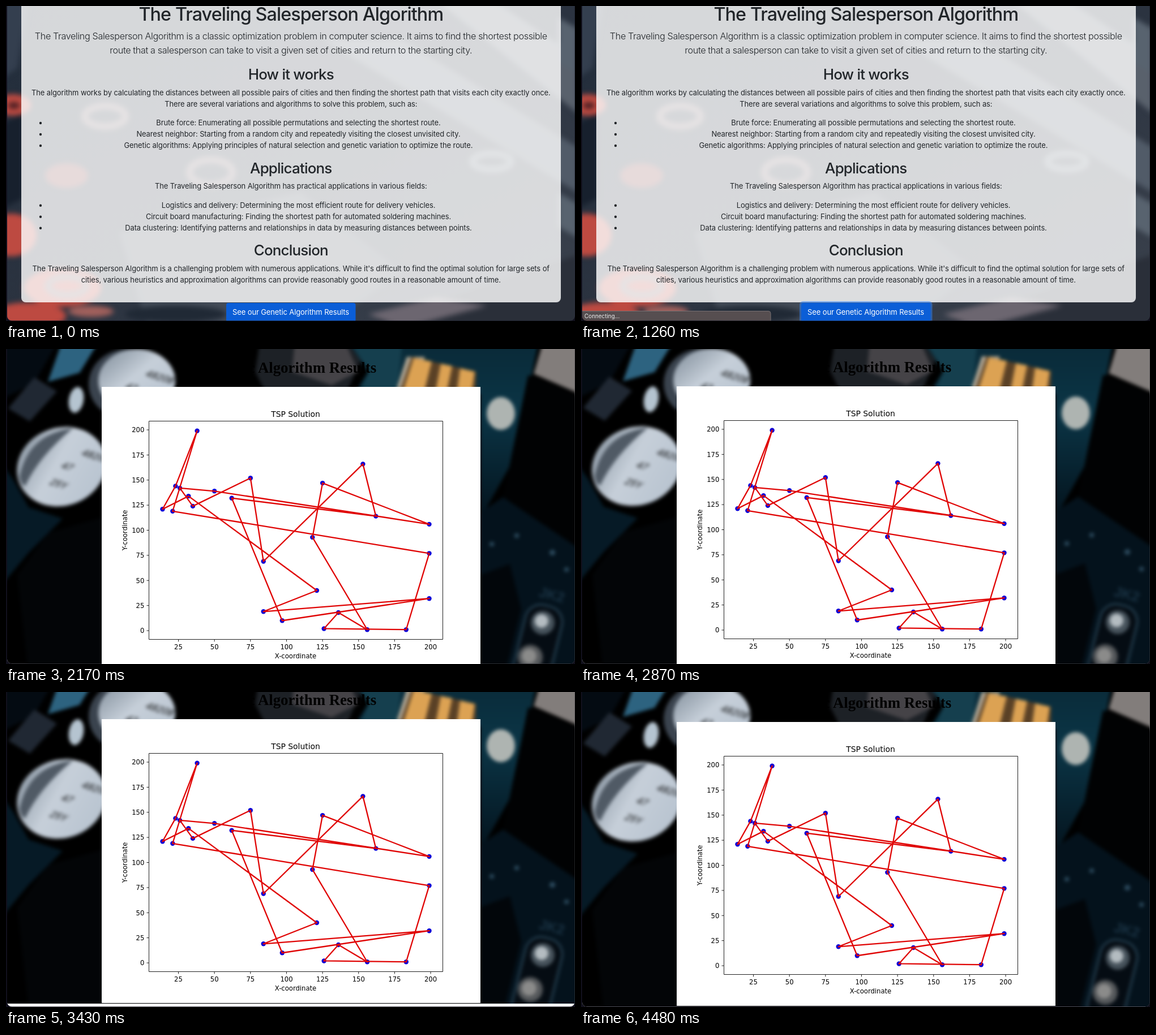
Write an HTML page that moves like this. It is 1005 px wide and 557 px high and loops after 4550 ms.

```html
<!DOCTYPE html>
<html lang="en">
<head>
<meta charset="utf-8">
<title>Traveling Salesperson</title>
<style>
  html, body { margin: 0; width: 100%; height: 100%; overflow: hidden; background: #11101c; }
  svg { display: block; }
  #stage { width: 1005px; height: 557px; }
  text { font-family: Inter, "Open Sans", sans-serif; font-optical-sizing: none; }
  .soft { filter: blur(5px); }
  .board { filter: blur(3px); }
  #copy text { text-anchor: middle; fill: #212529; }
  #copy .h1 { font-size: 32.3px; font-weight: 500; letter-spacing: -.028em; }
  #copy .h2 { font-size: 25.9px; font-weight: 500; letter-spacing: -.03em; }
  #copy .lead { font-size: 16.2px; font-weight: 300; letter-spacing: -.0235em; }
  #copy .p, .label { font-size: 12.95px; letter-spacing: -.007em; }
  .label { fill: #fff; text-anchor: middle; }
  .title { font: bold 26.8px "Liberation Serif", serif; text-anchor: middle; }
  .board text { font: bold 30px "Liberation Sans", sans-serif; fill: #39424f; text-anchor: middle; }
  .board .code { font-size: 25px; }
  .board .part { font-size: 25px; fill: #1a3344; }
  #plot text { font: 11.6px "DejaVu Sans", sans-serif; text-anchor: middle; }
  #plot .y { text-anchor: end; }
  #plot .head { font-size: 13.9px; }
</style>
</head>
<body>
<svg id="stage" viewBox="0 0 1005 557">
  <defs>
    <clipPath id="win"><rect x="2" y="-20" width="1002.5" height="576.3" rx="8"/></clipPath>
    <linearGradient id="metal" x2="1" y2="1">
      <stop stop-color="#7c8996"/><stop offset=".45" stop-color="#c6cfd9"/><stop offset="1" stop-color="#b4c0cd"/>
    </linearGradient>
    <linearGradient id="slate" x2="1" y2="1">
      <stop stop-color="#222d3b"/><stop offset=".5" stop-color="#2b3340"/><stop offset="1" stop-color="#3b424d"/>
    </linearGradient>
    <linearGradient id="teal" x2="0" y2="1">
      <stop stop-color="#0a2a38"/><stop offset=".4" stop-color="#0b3546"/><stop offset="1" stop-color="#04131d"/>
    </linearGradient>
    <g id="stamp">
      <text class="code">48208</text><text x="-13" y="32">47</text><text x="-8" y="66">25Y</text>
    </g>
  </defs>
  <g clip-path="url(#win)">
    <g id="intro">
      <rect width="1005" height="557" fill="url(#slate)"/>
      <g class="soft">
        <path d="M-10-10H40L20 110-10 130Z" fill="#343f4f"/>
        <path d="M-10 210 30 190V340L-10 360Z" fill="#17202d"/>
        <path d="M300-10H760L1010 190V90L860-10Z" fill="#59616c"/>
        <path d="M560 60 1010 330V250L700 60Z" fill="#515b68"/>
        <path d="M200 400 520 330 700 470 560 570H250Z" fill="#434b57"/>
        <path d="M620 570 1010 440V570Z" fill="#2a2f39"/>
        <path d="M640 545 760 515 850 530 700 570Z" fill="#6c6670"/>
        <path d="M975 20 1010 40V120L975 100ZM975 330 1010 350V410L975 390Z" fill="#58636f"/>
        <g fill="#bd4a41">
          <ellipse cx="12" cy="175" rx="32" ry="19"/>
          <ellipse cx="10" cy="405" rx="44" ry="38"/>
          <ellipse cx="100" cy="498" rx="68" ry="34"/>
          <ellipse cx="40" cy="548" rx="66" ry="24"/>
          <ellipse cx="107" cy="300" rx="38" ry="22" opacity=".6"/>
        </g>
        <g fill="none" stroke="#7c6a70" stroke-width="12">
          <ellipse cx="175" cy="195" rx="36" ry="18"/>
          <ellipse cx="362" cy="294" rx="38" ry="22"/>
          <ellipse cx="108" cy="495" rx="34" ry="16"/>
          <ellipse cx="858" cy="275" rx="34" ry="14" stroke="#66717c"/>
        </g>
        <ellipse cx="14" cy="176" rx="11" ry="6" fill="#491e23"/>
        <ellipse cx="300" cy="545" rx="90" ry="15" fill="#202935"/>
        <ellipse cx="150" cy="540" rx="40" ry="10" fill="#a1605c"/>
      </g>
      <rect x="27" y="-20" width="953" height="544" rx="8" fill="#fff" opacity=".81"/>
      <g id="copy"></g>
      <rect id="ring" x="386" y="522" width="234.5" height="40" rx="6" fill="#3184fd"/>
      <rect x="389" y="525" width="228.5" height="34" rx="4" fill="#0b5ed7"/>
      <text class="label" x="503" y="545.5">See our Genetic Algorithm Results</text>
    </g>
    <g id="results">
      <rect width="1005" height="557" fill="#fff"/>
      <g id="page">
        <svg width="1005" height="570">
          <rect width="1005" height="570"/>
          <g class="board">
            <path d="M-10-10H90L50 60-10 90Z" fill="#040b12"/>
            <path d="M98-10H162L130 42 74 58Z" fill="#2d6380"/>
            <path d="M4 105 50 50 90 75 42 128Z" fill="#202833"/>
            <ellipse cx="124" cy="90" rx="13" ry="23" fill="#b5c4d0" transform="rotate(10 124 90)"/>
            <path d="M-10 200 12 230 40 280 100 300 40 360-10 420Z" fill="#061a26"/>
            <path d="M20 400 75 325 180 295V580H40Z" fill="#030507"/>
            <ellipse cx="214" cy="62" rx="68" ry="62" fill="#3a434e"/>
            <ellipse cx="231" cy="56" rx="68" ry="56" fill="url(#metal)"/>
            <ellipse cx="96" cy="212" rx="72" ry="66" fill="#1c242d"/>
            <ellipse cx="98" cy="208" rx="80" ry="69" fill="url(#metal)" transform="rotate(-20 98 208)"/>
            <path d="M118 140Q40 150 24 225Q26 240 34 242Q58 190 118 140Z" fill="#505a65"/>
            <use href="#stamp" transform="translate(244 47) rotate(17) skewX(-25)"/>
            <use href="#stamp" transform="translate(131 187) rotate(17) skewX(-25)"/>
            <path d="M448-10H640L600 80H460L440 40Z" fill="#1d2126"/>
            <path d="M510-10H600L622 40 575 64 505 40Z" fill="#454347"/>
            <path d="M606-10H850L905 180 838 300V80H615L640 40Z" fill="url(#teal)"/>
            <path d="M610-10H700L690 80H625L640 40Z" fill="#153f4e"/>
            <path d="M838-10H940L900 180 838 300Z" fill="url(#teal)"/>
            <path d="M690 70 708 14 740 14 712 80Z" fill="#b7ab97"/>
            <path d="M716 14 830 40V90H690Z" fill="#5a4126"/>
            <path d="M720 16 752 22 738 78H700ZM768 26 788 30 778 78H758ZM802 34 828 40 822 78H796Z" fill="#dca253"/>
            <ellipse cx="874" cy="114" rx="25" ry="29" fill="#aeb4b1"/>
            <path d="M948-10H1015V80L932 44Z" fill="#827d7b"/>
            <path d="M922 46 1015 86V360L878 262Z" fill="#010203"/>
            <path d="M836 290 878 262 1015 355V580H836Z" fill="#04121c"/>
            <path d="M836 400 890 380 910 460 880 580H836Z" fill="#02060a"/>
            <g fill="#2e4d61">
              <circle cx="902" cy="330" r="4"/><circle cx="965" cy="360" r="5"/>
              <circle cx="858" cy="345" r="4"/><circle cx="990" cy="390" r="4"/>
            </g>
            <text class="part" x="962" y="443" transform="rotate(14 962 443)">JK2</text>
            <rect x="912" y="453" width="66" height="150" rx="28" fill="#050c13" stroke="#213a4a" stroke-width="4" transform="rotate(14 945 500)"/>
            <circle cx="948" cy="484" r="21" fill="#46525b"/><circle cx="946" cy="481" r="12" fill="#b4bcc1"/>
            <circle cx="926" cy="545" r="22" fill="#55585b"/><circle cx="924" cy="543" r="13" fill="#8b8b8a"/>
          </g>
          <text class="title" x="503" y="42">Genetic Algorithm Results</text>
          <g id="plot" transform="translate(0 67)"></g>
        </svg>
      </g>
    </g>
    <g id="status">
      <path d="M0 539.5H331Q335 539.5 335 543.5V560H0Z" fill="#564e50" stroke="#777073"/>
      <text x="6" y="551.5" font-size="9.9" fill="#ececec">Connecting...</text>
    </g>
  </g>
</svg>
<script>
const $ = id => document.getElementById(id);

// Article: class, baseline, text; list items get a bullet.
const lines = [
  ['h1', 26, 'The Traveling Salesperson Algorithm'],
  ['lead', 59, 'The Traveling Salesperson Algorithm is a classic optimization problem in computer science. It aims to find the shortest possible'],
  ['lead', 84, 'route that a salesperson can take to visit a given set of cities and return to the starting city.'],
  ['h2', 129.5, 'How it works'],
  ['p', 157.7, 'The algorithm works by calculating the distances between all possible pairs of cities and then finding the shortest path that visits each city exactly once.'],
  ['p', 177.8, 'There are several variations and algorithms to solve this problem, such as:'],
  ['p li', 211, 'Brute force: Enumerating all possible permutations and selecting the shortest route.'],
  ['p li', 231, 'Nearest neighbor: Starting from a random city and repeatedly visiting the closest unvisited city.'],
  ['p li', 251, 'Genetic algorithms: Applying principles of natural selection and genetic variation to optimize the route.'],
  ['h2', 295.5, 'Applications'],
  ['p', 323.3, 'The Traveling Salesperson Algorithm has practical applications in various fields:'],
  ['p li', 356.7, 'Logistics and delivery: Determining the most efficient route for delivery vehicles.'],
  ['p li', 376.8, 'Circuit board manufacturing: Finding the shortest path for automated soldering machines.'],
  ['p li', 396.8, 'Data clustering: Identifying patterns and relationships in data by measuring distances between points.'],
  ['h2', 441, 'Conclusion'],
  ['p', 469, "The Traveling Salesperson Algorithm is a challenging problem with numerous applications. While it's difficult to find the optimal solution for large sets of"],
  ['p', 489.3, 'cities, various heuristics and approximation algorithms can provide reasonably good routes in a reasonable amount of time.'],
];
$('copy').innerHTML = lines.map(([cls, y, s]) => {
  const x = cls === 'p li' ? 516.5 : 503.3;
  const dot = cls === 'p li' ? `<circle cx="61" cy="${y - 4}" r="2.2" fill="#212529"/>` : '';
  return `${dot}<text class="${cls}" x="${x}" y="${y}">${s}</text>`;
}).join('');

// Chart, in image coordinates below its top edge.
const px = x => 240.85 + x * 2.546, py = y => 431 - y * 1.775;
const tour = [
  [38, 199], [23, 144], [14, 121], [32, 134], [121, 40], [84, 19], [199, 32],
  [97, 10], [62, 132], [162, 114], [153, 166], [84, 69], [75, 152], [35, 124],
  [26, 142], [50, 139], [199, 106], [125, 147], [118, 93], [156, 1], [136, 18],
  [126, 2], [183, 1], [199, 77], [21, 119],
].map(([x, y]) => [px(x), py(y)]);

let chart = '<rect x="169" width="669" height="502" fill="#fff"/>';
let ticks = '';
for (let v = 0; v <= 200; v += 25) {
  const x = px(v), y = py(v);
  if (v) {
    ticks += `M${x} 446.5v4`;
    chart += `<text x="${x}" y="464.2">${v}</text>`;
  }
  ticks += `M252.5 ${y}h-4`;
  chart += `<text class="y" x="244.3" y="${y + 4.3}">${v}</text>`;
}
chart += tour.map(([x, y]) => `<circle cx="${x}" cy="${y}" r="4.2" fill="#0d00d8"/>`).join('')
  + `<path d="M${tour.join('L')}Z" fill="none" stroke="#e00505" stroke-width="2.3" stroke-linejoin="round"/>`
  + `<path d="${ticks}M252.5 60.5H771.5V446.5H252.5Z" fill="none" stroke="#222"/>`
  + '<text class="head" x="511.5" y="53">TSP Solution</text>'
  + '<text x="511.5" y="480">X-coordinate</text>'
  + '<text transform="translate(214 253.5) rotate(-90)">Y-coordinate</text>';
$('plot').innerHTML = chart;

const LOOP = 4550, STEP = 70, LOAD = 1680;
// Scroll down past the page end, hold, then spring back.
const scroll = [
  [2800, 0], [2870, -1], [3010, -5], [3220, -15], [3360, -18], [3430, -19], [3780, -21],
  [3850, -21], [3990, -18], [4060, -16.7], [4130, -15.7], [4200, -15], [4270, -15],
  [4340, -14.5], [4410, -14.5], [4480, -14],
];
function scrollAt(t) {
  const i = scroll.findIndex(k => k[0] > t);
  if (i === 0) return 0;
  if (i < 0) return scroll.at(-1)[1];
  const [[t0, a], [t1, b]] = [scroll[i - 1], scroll[i]];
  return a + (b - a) * (t - t0) / (t1 - t0);
}

// Progress over the steps from a to b, both included.
const ramp = (t, a, b) => Math.min(1, Math.max(0, (t - a + STEP) / (b - a + STEP)));

const start = performance.now();
function draw() {
  const t = Math.floor((performance.now() - start) % LOOP / STEP) * STEP;
  $('intro').style.display = t < LOAD ? '' : 'none';
  $('results').style.display = t < LOAD ? 'none' : '';
  $('ring').setAttribute('opacity', ramp(t, 210, 420) * .5);
  $('status').setAttribute('opacity', ramp(t, 1190, 1260) - ramp(t, 1960, 2170));
  $('page').setAttribute('transform', `translate(0 ${scrollAt(t)})`);
  requestAnimationFrame(draw);
}
draw();
</script>
</body>
</html>
```
